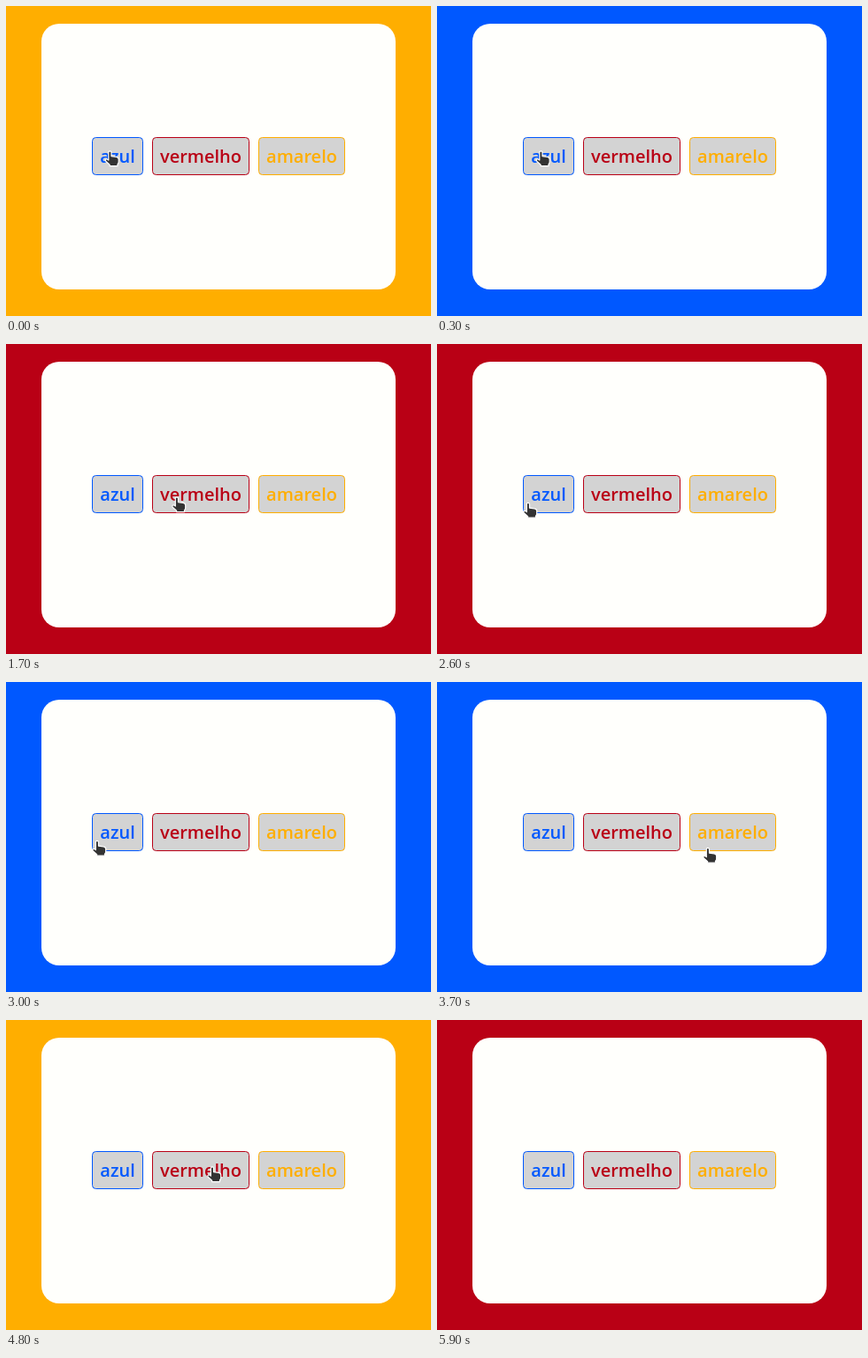
Write an HTML page that moves like this. It is 480 px wide and 350 px high and loops after 6900 ms.

```html
<!DOCTYPE html>
<html lang="pt">
<head>
<meta charset="utf-8">
<title>Cores</title>
<style>
  html, body { margin: 0; width: 100%; height: 100%; overflow: hidden; }
  svg { display: block; width: 480px; height: 350px; }
  text { font: 600 20px "Open Sans", "Noto Sans", sans-serif; text-anchor: middle; }
</style>
</head>
<body>
<svg viewBox="0 0 480 350">
  <rect id="backdrop" width="480" height="350"/>
  <rect x="40" y="20" width="400" height="300" rx="20" fill="#fffffc"/>
  <g id="buttons"></g>
  <g id="cursor" fill="#333" stroke="#fff" stroke-width="1.2" stroke-linejoin="round">
    <path id="hand" d="M-1.7 9V1.5a1.6 1.6 0 0 1 3.2 0V5.6l5.6 .7q2.6 .4 2.6 2.8v3q0 1.6-1.2 2.6v2H-.4v-1.6L-4.8 11.2q-.9-1.3 .2-2.1t2.9 1z"/>
    <path id="arrow" d="M0 0V15l3.6-3.3 2.5 5.5 2.6-1.2-2.5-5.3H11z"/>
  </g>
</svg>
<script>
(() => {
  const LOOP = 6900;
  const blue = "#0058ff", red = "#b90015", yellow = "#ffae00";

  const buttons = [
    { label: "azul", color: blue, x: 97, width: 58 },
    { label: "vermelho", color: red, x: 165, width: 110 },
    { label: "amarelo", color: yellow, x: 285, width: 98 },
  ];
  const buttonTop = 148, buttonHeight = 43;

  // Each click recolours the backdrop at once.
  const clicks = [[0, yellow], [300, blue], [1700, red], [3000, blue], [4100, yellow], [5200, red]];

  // Pointer moves: first sample, sample count, then quadratic curve points.
  const moves = [
    { start: 1000, steps: 2, path: [[117.5, 164], [150, 169], [193, 173]] },
    { start: 2000, steps: 7, path: [[193, 173], [255, 276], [103, 179.5]] },
    { start: 3300, steps: 5, path: [[103, 179.5], [200, 215], [306, 187.5]] },
    { start: 4600, steps: 3, path: [[306, 187.5], [275, 180], [233, 166]] },
    { start: 5800, steps: 1, path: [[233, 166], [243, 160], [251, 153]] },
  ];
  const exitTime = 5900, tick = 100;

  const byId = id => document.getElementById(id);
  const backdrop = byId("backdrop"), cursor = byId("cursor"), hand = byId("hand"), arrow = byId("arrow");

  byId("buttons").innerHTML = buttons.map(({ label, color, x, width }) => `
    <rect x="${x + .5}" y="${buttonTop + .5}" width="${width - 1}" height="${buttonHeight - 1}" rx="4" fill="#d3d3d3" stroke="${color}"/>
    <text x="${x + width / 2}" y="177" fill="${color}">${label}</text>`).join("");

  const curve = ([a, b, c], p) =>
    a.map((v, i) => (1 - p) ** 2 * v + 2 * p * (1 - p) * b[i] + p * p * c[i]);

  const latest = (list, test) => list.filter(test).pop();

  function pointerAt(time) {
    const move = latest(moves, m => time >= m.start);
    if (!move) return moves[0].path[0];
    const step = Math.floor((time - move.start) / tick) + 1;
    return curve(move.path, Math.min(1, step / move.steps));
  }

  function overButton([x, y]) {
    return y >= buttonTop && y <= buttonTop + buttonHeight &&
      buttons.some(b => x >= b.x && x <= b.x + b.width);
  }

  function show(element, visible) {
    element.setAttribute("visibility", visible ? "visible" : "hidden");
  }

  function draw(time) {
    backdrop.setAttribute("fill", latest(clicks, ([start]) => time >= start)[1]);
    const point = pointerAt(time);
    const present = time < exitTime, over = overButton(point);
    cursor.setAttribute("transform", `translate(${point})`);
    show(hand, present && over);
    show(arrow, present && !over);
  }

  const began = performance.now();
  function frame() {
    draw((performance.now() - began) % LOOP);
    requestAnimationFrame(frame);
  }
  frame();
})();
</script>
</body>
</html>
```
